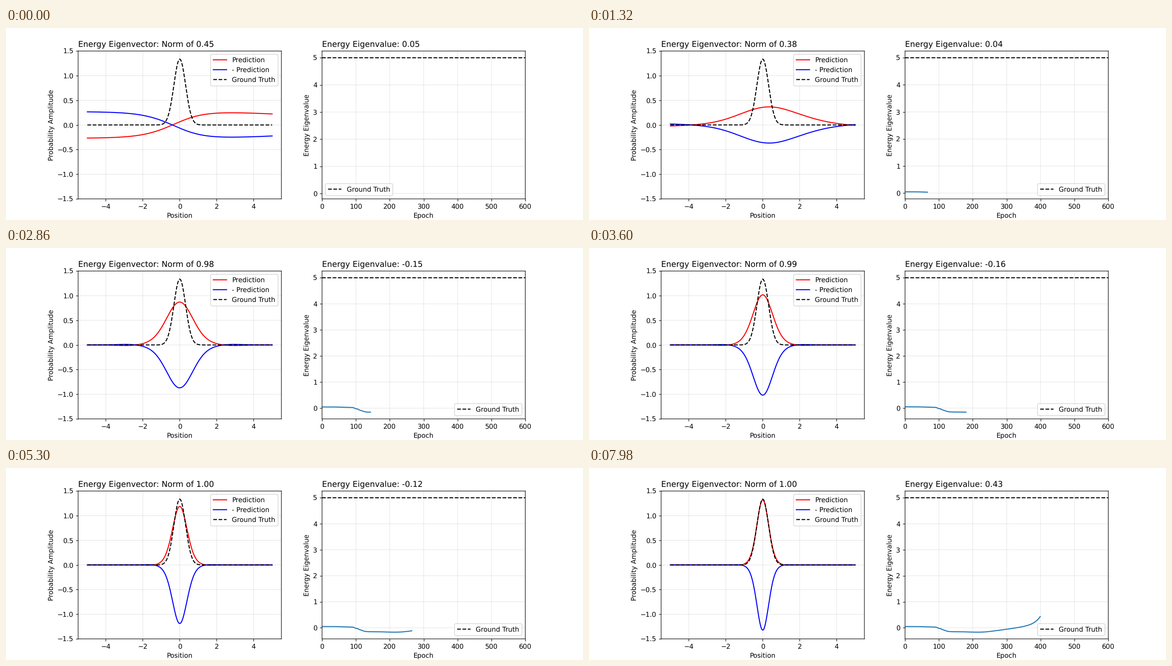
Recreate the animation shown at these times as a matplotlib script. Size 1280 by 427 pixels, loop 8 s.

```python
import numpy as np
import matplotlib.pyplot as plt
from matplotlib.animation import FuncAnimation

FRAMES, INTERVAL = 400, 20
DPI = 128
S = 5 / 6  # keeps default point sizes proportional to a 12 inch wide figure

plt.rcParams.update({
    "font.family": "DejaVu Sans",
    "font.size": 10 * S,
    "text.hinting": "no_hinting",
    "lines.linewidth": 1.5 * S,
    "patch.linewidth": 1.0 * S,
    "axes.linewidth": 0.8 * S,
    "axes.labelpad": 4 * S,
    "axes.titlepad": 6 * S,
    "grid.linewidth": 0.8 * S,
    "grid.alpha": 0.3,
})
for tick in ("xtick", "ytick"):
    plt.rcParams.update({
        f"{tick}.major.size": 3.5 * S,
        f"{tick}.major.width": 0.8 * S,
        f"{tick}.major.pad": 3.5 * S,
    })

# Ground state of a harmonic oscillator with frequency 10
OMEGA = 10
TRUE_E = OMEGA / 2
x = np.linspace(-5, 5, 501)
dx = x[1] - x[0]
truth = (OMEGA / np.pi) ** 0.25 * np.exp(-OMEGA * x ** 2 / 2)

epoch = np.arange(FRAMES)


def rise(mid, scale):
    """Logistic step from 0 to 1 over the epochs."""
    return 1 / (1 + np.exp((mid - epoch) / scale))


# The eigenvalue falls in a few steps, then climbs ever faster
energy = (0.048 - 0.02 * rise(60, 10) - 0.05 * rise(95.5, 1.8)
          - 0.03 * rise(107, 1) - 0.1 * rise(118, 5) - 0.018 * rise(188, 9)
          + 0.00175 * 8 * np.log1p(np.exp((epoch - 235) / 8))
          + 0.315 * np.exp((epoch - 399) / 18))

# The norm first collapses, then grows to one
norm = (0.445 * np.exp(-epoch / 12)
        + rise(71.5, 13) * (1 - 0.05 * np.exp(-(epoch / 140) ** 2)))

width = 1.653 - 1.17 * rise(113, 21.5) - 0.167 * rise(260, 22)
center = -0.05 * np.exp(-((epoch - 99) / 30) ** 2)


def normalized(f):
    return f / np.sqrt(np.sum(f ** 2) * dx)


def first_guess():
    u = x + 0.4
    return (0.267 - 0.0016 * np.maximum(u, 0) ** 2) * np.tanh(0.6 * u + 0.02 * u ** 2)


def lopsided_hump():
    u = x - 0.95
    return 0.196 * np.exp(-0.5 * (u / np.where(u < 0, 1.45, 1.83)) ** 2) - 0.02


def bell(n, k=6):
    """Near-Gaussian peak with shallow negative lobes on both sides."""
    s = width[n]
    u = (x - center[n]) / s
    lobes = np.exp(-0.5 * ((np.abs(u) - 3.9) / 0.8) ** 2)
    return np.cosh(u / np.sqrt(k)) ** -k - 0.026 * s ** 1.5 * lobes


start, hump = first_guess(), lopsided_hump()


def prediction(n):
    if n < 36:
        w = n / 36
        shape = (1 - w) * start + w * hump
    else:
        w = min((n - 36) / 49, 1)
        w = w * w * (3 - 2 * w)
        shape = (1 - w) * normalized(hump) + w * normalized(bell(n))
    return np.sqrt(norm[n]) * normalized(shape)


fig, (left, right) = plt.subplots(1, 2, figsize=(10, 427 / DPI), dpi=DPI)
fig.subplots_adjust(left=0.125, right=0.9, bottom=0.11, top=0.88, wspace=0.2)

pos_line, = left.plot(x, truth, "r", label="Prediction")
neg_line, = left.plot(x, -truth, "b", label="- Prediction")
left.plot(x, truth, "k--", label="Ground Truth")
left.set(xlim=(-5.5, 5.5), ylim=(-1.5, 1.5), xticks=range(-4, 5, 2),
         yticks=np.arange(-1.5, 1.6, 0.5),
         xlabel="Position", ylabel="Probability Amplitude")
left.legend(loc="upper right")

energy_line, = right.plot([], [], "C0")
right.plot([0, 600], [TRUE_E, TRUE_E], "k--", label="Ground Truth")
right.set(xlim=(0, 600), ylim=(-0.2, 5.25), xticks=range(0, 601, 100),
          yticks=range(6), xlabel="Epoch", ylabel="Energy Eigenvalue")
legend = right.legend(loc="lower left")

left_title = left.set_title("", loc="left", y=1.0)
right_title = right.set_title("", loc="left", y=1.0)

for ax in (left, right):
    ax.grid(True)

# Fix the axis labels where the layout puts them, which speeds up drawing
fig.canvas.draw()
for axis in (left.xaxis, left.yaxis, right.xaxis, right.yaxis):
    label = axis.label
    axis.set_label_coords(*label.get_position(), transform=label.get_transform())

# Soft lines at their true positions instead of whole pixels
for artist in fig.findobj():
    artist.set_snap(False)


def update(n):
    psi = prediction(n)
    pos_line.set_ydata(psi)
    neg_line.set_ydata(-psi)
    left_title.set_text(f"Energy Eigenvector: Norm of {norm[n]:.2f}")

    seen = energy[:n + 1]
    energy_line.set_data(epoch[:n + 1], seen)
    low = seen.min()
    margin = 0.05 * (TRUE_E - low)
    right.set_ylim(low - margin, TRUE_E + margin)
    right_title.set_text(f"Energy Eigenvalue: {energy[n]:.2f}")
    legend.set_loc("lower left" if n < 10 else "lower right")
    return pos_line, neg_line, energy_line


anim = FuncAnimation(fig, update, frames=FRAMES, interval=INTERVAL,
                     init_func=lambda: update(0), repeat=True, repeat_delay=0)
plt.show()
```
